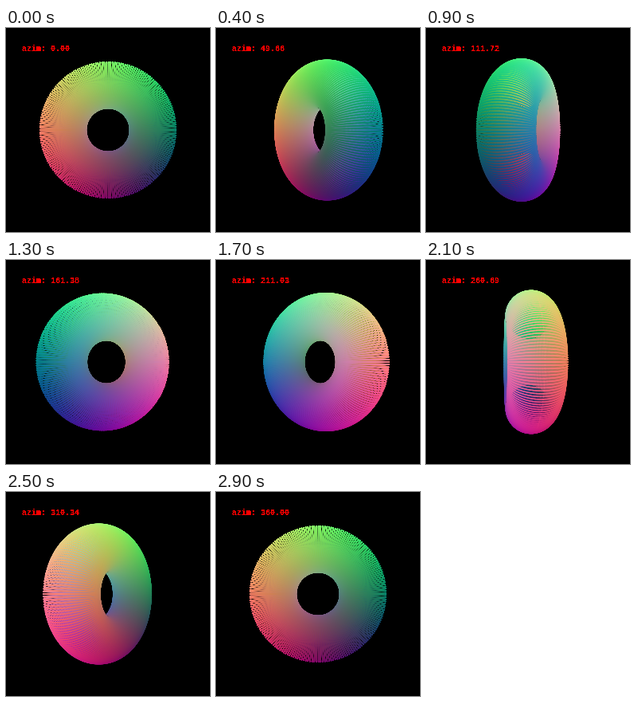
These frames come from a looping animation (256x256 px, 3 s). An HTML page with a canvas:

```html
<!DOCTYPE html>
<html lang="en">
<head>
<meta charset="utf-8">
<title>Rotating torus point cloud</title>
<style>
html, body { margin: 0; width: 100%; height: 100%; overflow: hidden; background: #000; }
canvas { display: block; width: 256px; height: 256px; }
</style>
</head>
<body>
<canvas id="stage" width="256" height="256"></canvas>
<script>
const SIZE = 256, STEPS = 30, STEP_MS = 100;
const MAJOR = 1, MINOR = 0.5, SAMPLES = 200;
const DISTANCE = 4, DOT = 0.01 * SIZE / 2, MAX_LAYERS = 10;
const FOCAL = SIZE / 2 / Math.tan(Math.PI / 6);
const TAU = Math.PI * 2;

const ctx = document.getElementById('stage').getContext('2d', { willReadFrequently: true });
const image = ctx.createImageData(SIZE, SIZE);
const light = new Float32Array(SIZE * SIZE * 3);
const clear = new Float32Array(SIZE * SIZE);
const layers = new Uint8Array(SIZE * SIZE);

// Each axis maps linearly onto one colour channel.
const channel = v => 255 * (v / (MAJOR + MINOR) + 1) / 2;

// Both angles run over the full turn including its end; x grows to the left.
const points = [];
for (let i = 0; i < SAMPLES; i++) {
  const phi = TAU * i / (SAMPLES - 1);
  for (let j = 0; j < SAMPLES; j++) {
    const theta = TAU * j / (SAMPLES - 1);
    const radius = MAJOR + MINOR * Math.cos(theta);
    const x = -radius * Math.cos(phi);
    const y = radius * Math.sin(phi);
    const z = MINOR * Math.sin(theta);
    points.push({ x, y, z, r: channel(-x), g: channel(y), b: channel(-z), depth: 0 });
  }
}

// Adds a soft dot behind whatever already covers the pixels.
function plot(px, py, p) {
  const right = Math.floor(px + DOT), bottom = Math.floor(py + DOT);
  for (let y = Math.floor(py - DOT); y <= bottom; y++) {
    for (let x = Math.floor(px - DOT); x <= right; x++) {
      const dx = x + 0.5 - px, dy = y + 0.5 - py, k = y * SIZE + x;
      const alpha = 1 - (dx * dx + dy * dy) / (DOT * DOT);
      if (alpha <= 0 || layers[k] >= MAX_LAYERS) continue;
      const weight = alpha * clear[k];
      light[k * 3] += weight * p.r;
      light[k * 3 + 1] += weight * p.g;
      light[k * 3 + 2] += weight * p.b;
      clear[k] -= weight;
      layers[k]++;
    }
  }
}

function drawTorus(azim) {
  const c = Math.cos(azim), s = Math.sin(azim);
  light.fill(0);
  clear.fill(1);
  layers.fill(0);
  for (const p of points) p.depth = DISTANCE - p.x * s - p.z * c;
  points.sort((a, b) => a.depth - b.depth);
  for (const p of points) {
    const scale = FOCAL / p.depth;
    plot(SIZE / 2 + (p.x * c - p.z * s) * scale, SIZE / 2 - p.y * scale, p);
  }
  for (let k = 0; k < SIZE * SIZE; k++) {
    for (let n = 0; n < 3; n++) image.data[k * 4 + n] = light[k * 3 + n];
    image.data[k * 4 + 3] = 255;
  }
  ctx.putImageData(image, 0, 0);
}

function drawLabel(text) {
  ctx.font = 'bold 10px "Liberation Mono", monospace';
  ctx.fillStyle = '#f00';
  ctx.fillText(text, 20, 29);
  // Hard pixel edges instead of smoothed ones.
  const strip = ctx.getImageData(16, 18, 84, 16);
  for (let i = 0; i < strip.data.length; i += 4) {
    strip.data[i] = strip.data[i] > 100 ? 255 : 0;
  }
  ctx.putImageData(strip, 16, 18);
}

function draw(step) {
  const degrees = 360 * step / (STEPS - 1);
  drawTorus(degrees * TAU / 360);
  drawLabel('azim: ' + degrees.toFixed(2));
}

let shown = -1;
function tick() {
  const step = Math.floor(performance.now() / STEP_MS) % STEPS;
  if (step !== shown) draw(shown = step);
  requestAnimationFrame(tick);
}
tick();
</script>
</body>
</html>
```
